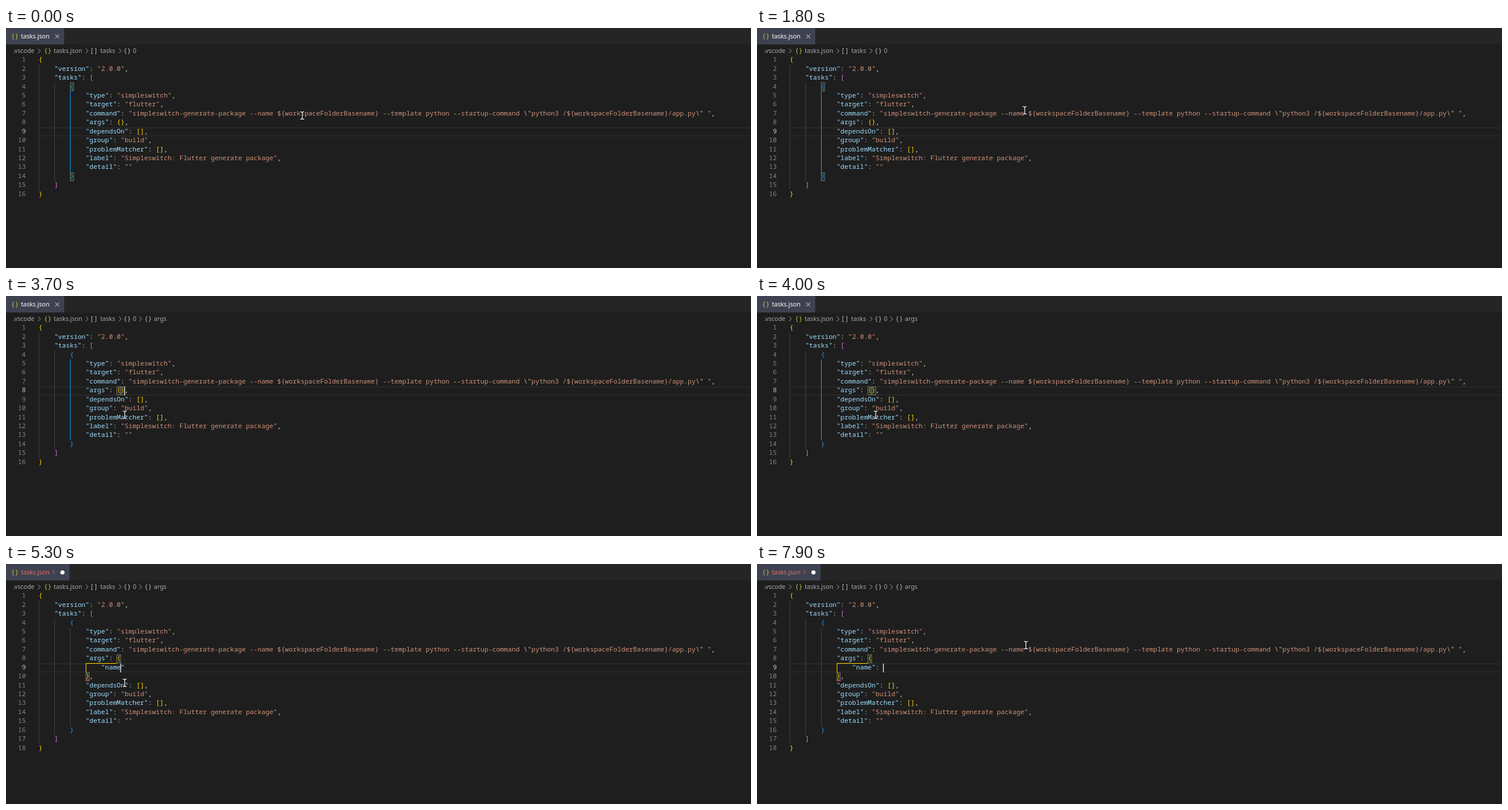
An HTML page with a canvas for the animation above (8000 ms loop, 1280 by 414 pixels).

```html
<!DOCTYPE html>
<html lang="en">
<head>
<meta charset="utf-8">
<title>Editing tasks.json</title>
<style>
  html, body { margin: 0; width: 100%; height: 100%; overflow: hidden; background: #1e1e1e; }
  canvas { display: block; }
</style>
</head>
<body>
<canvas id="stage" width="1280" height="414"></canvas>
<script>
const ctx = document.getElementById('stage').getContext('2d');
const LOOP = 8000, STEP = 100, BLINK = 500;
const LEFT = 56, TOP = 48, CHAR = 6.72, LINE = 15.43, BASELINE = 10.3;
const CODE_FONT = '11.2px "Noto Sans Mono", monospace';
const UI_FONT = '10.55px "Noto Sans", sans-serif';
const KEY = '#9cdcfe', STRING = '#ce9178', ESCAPE = '#d7ba7d', PLAIN = '#d4d4d4';
const BRACKETS = ['#ffd700', '#da70d6', '#179fff'];
const GUIDE = '#404040', ACTIVE_GUIDE = '#707070';

const FOLDER = '${workspaceFolderBasename}';
const HEAD = String.raw`{
    "version": "2.0.0",
    "tasks": [
        {
            "type": "simpleswitch",
            "target": "flutter",
            "command": "simpleswitch-generate-package --name ${FOLDER} --template python --startup-command \"python3 /${FOLDER}/app.py\" ",
            "args": {`;
const TAIL = `},
            "dependsOn": [],
            "group": "build",
            "problemMatcher": [],
            "label": "Simpleswitch: Flutter generate package",
            "detail": ""
        }
    ]
}`;

// "after" puts the caret behind a snippet; "edit" is the new line, with | as the caret.
const ACTIONS = [
  { t: -800, after: '"dependsOn": [],', crumb: '' },
  { t: 2000, after: '--name', crumb: '' },
  { t: 2300, after: '--name', crumb: 'command' },
  { t: 3300, after: '"args": {}', crumb: 'args' },
  { t: 4100, after: '"args": {', crumb: 'args' },
  { t: 4400, edit: '|', crumb: 'args' },
  { t: 4800, edit: '"|"', crumb: 'args' },
  { t: 5300, edit: '"name|"', crumb: 'args' },
  { t: 5900, edit: '"name"|', crumb: 'args' },
  { t: 6800, edit: '"name":|', crumb: 'args' },
  { t: 6900, edit: '"name": |', crumb: 'args' }
];

const MOUSE_START = { x: 509, y: 151 };
const MOUSE_MOVES = [
  { from: 300, to: 500, x: 505, y: 149 },
  { from: 900, to: 1400, x: 478, y: 140 },
  { from: 1500, to: 1800, x: 460, y: 142 },
  { from: 1800, to: 2000, x: 447, y: 149 },
  { from: 2600, to: 2700, x: 222, y: 173 },
  { from: 2700, to: 3000, x: 202, y: 165 },
  { from: 3300, to: 3700, x: 204, y: 205 },
  { from: 7300, to: 7500, x: 194, y: 234 },
  { from: 7500, to: 7900, x: 462, y: 140 }
];

const colX = col => LEFT + col * CHAR;
const lineY = line => TOP + (line - 1) * LINE;
const baseline = line => Math.round(lineY(line) + BASELINE);
const order = (line, col) => line * 1000 + col;

function rect(x, y, w, h, color) {
  ctx.fillStyle = color;
  ctx.fillRect(x, y, w, h);
}

function text(str, x, y, color, font) {
  ctx.font = font;
  ctx.fillStyle = color;
  ctx.fillText(str, x, y);
}

function stroke(points, color, width) {
  ctx.strokeStyle = color;
  ctx.lineWidth = width;
  ctx.beginPath();
  points.forEach(([x, y]) => ctx.lineTo(x, y));
  ctx.stroke();
}

function buildLines(edit) {
  if (edit === undefined) return (HEAD + TAIL).split('\n');
  const pad = ' '.repeat(12);
  return `${HEAD}\n${pad}    ${edit.replace('|', '')}\n${pad}${TAIL}`.split('\n');
}

function findCaret(action, lines) {
  if (action.edit !== undefined) {
    return { line: HEAD.split('\n').length + 1, col: 16 + action.edit.indexOf('|') };
  }
  const index = lines.findIndex(line => line.includes(action.after));
  return { line: index + 1, col: lines[index].indexOf(action.after) + action.after.length };
}

// Returns coloured tokens and the bracket pairs, inner pairs first.
function parse(lines) {
  const tokens = [], pairs = [], open = [];
  lines.forEach((source, i) => {
    for (const { 0: str, index: col } of source.matchAll(/"(?:\\.|[^"\\])*"|[{}[\]:,]/g)) {
      const line = i + 1;
      const add = (part, at, color) => tokens.push({ str: part, line, col: at, color });
      if (str[0] === '"') {
        const base = source.slice(0, col).includes(':') ? STRING : KEY;
        for (const part of str.matchAll(/\\.|[^\\\s]+/g)) {
          add(part[0], col + part.index, part[0][0] === '\\' ? ESCAPE : base);
        }
      } else if ('{['.includes(str)) {
        const color = BRACKETS[open.length % 3];
        open.push({ line, col, color });
        add(str, col, color);
      } else if ('}]'.includes(str)) {
        const start = open.pop();
        pairs.push({ start, end: { line, col }, color: start.color });
        add(str, col, start.color);
      } else {
        add(str, col, PLAIN);
      }
    }
  });
  return { tokens, pairs };
}

// A margin of 1 also accepts a caret that touches the pair from outside.
function enclosing(pairs, caret, margin) {
  const pos = order(caret.line, caret.col);
  return pairs.filter(({ start, end }) =>
    pos > order(start.line, start.col) - margin && pos <= order(end.line, end.col) + margin);
}

function drawGuide({ start, end }, color) {
  const height = (end.line - start.line - 1) * LINE;
  if (height > 0) rect(Math.round(colX(end.col)), lineY(start.line + 1), 1, height, color);
}

function drawGuides(pairs, caret, lines) {
  pairs.forEach(pair => drawGuide(pair, GUIDE));
  const [inner, outer] = enclosing(pairs, caret, 0);
  const { start, end } = inner;
  const empty = !lines.slice(start.line, end.line - 1).join('').trim();
  if (empty) drawGuide(outer, ACTIVE_GUIDE);
  drawGuide(inner, inner.color);
  if (end.line > start.line) {
    const x = Math.round(colX(end.col));
    rect(x, Math.round(lineY(start.line + 1)), colX(start.col) - x, 1, inner.color);
  }
}

function drawBracketBox({ line, col }) {
  const x = Math.round(colX(col)) + 0.5, y = Math.round(lineY(line)) + 0.5;
  rect(x, y, 6, 14, 'rgba(0, 100, 0, 0.1)');
  ctx.strokeStyle = '#7a7a7a';
  ctx.lineWidth = 1;
  ctx.strokeRect(x, y, Math.round(colX(col + 1)) - x - 0.5 + 1 - 0.5, 14);
}

function drawSelection(caret, source, withMatches) {
  const word = 'name';
  for (const { index } of source.matchAll(word)) {
    const selected = index + word.length === caret.col;
    if (!selected && !withMatches) continue;
    rect(colX(index), lineY(caret.line), word.length * CHAR, LINE, selected ? '#264f78' : '#3a4045');
  }
}

function drawLineHighlight(line) {
  [lineY(line), lineY(line + 1) - 1.5].forEach(y => rect(LEFT, y, 1222, 1.5, '#2b2b2b'));
}

function drawLineNumbers(count, active) {
  ctx.textAlign = 'right';
  for (let n = 1; n <= count; n++) {
    text(n, 34, baseline(n), n === active ? '#c6c6c6' : '#858585', CODE_FONT);
  }
  ctx.textAlign = 'left';
}

function bracketIcon(pair, x, y, color) {
  text(pair[0], x, y, color, UI_FONT);
  text(pair[1], x + 6.5, y, color, UI_FONT);
}

function drawTab(dirty, error) {
  const end = error ? 109 : 100, x = end - 12, y = 14.5;
  rect(0, 0, 1280, 28.4, '#252526');
  rect(0, 0, end, 28.4, '#3e4250');
  bracketIcon('{}', 10, 18, '#cbcb41');
  text('tasks.json', 25.7, 18, error ? '#ee6f64' : '#ffffff', UI_FONT);
  if (error) text('1', 79, 18, '#d9685e', '9.5px "Noto Sans", sans-serif');
  if (dirty) {
    ctx.fillStyle = '#ffffff';
    ctx.beginPath();
    ctx.arc(x, y, 3.6, 0, Math.PI * 2);
    ctx.fill();
  } else {
    for (const d of [-3.5, 3.5]) stroke([[x - 3.5, y - d], [x + 3.5, y + d]], '#e4e4e4', 1);
  }
}

function drawBreadcrumbs(last) {
  const gray = '#a9a9a9', icon = '#c0c0c0', y = 43;
  const label = (str, x) => text(str, x, y, gray, UI_FONT);
  const chevron = x => stroke([[x - 2, 35.5], [x + 2, 39.5], [x - 2, 43.5]], gray, 1);
  label('.vscode', 11.7);
  [57, 139, 196].forEach(chevron);
  bracketIcon('{}', 66.5, y, '#cbcb41');
  label('tasks.json', 82);
  bracketIcon('[]', 146, y, icon);
  label('tasks', 162);
  bracketIcon('{}', 203, y, icon);
  label('0', 218);
  if (!last) return;
  chevron(231);
  label(last, 254);
  if (last === 'args') {
    bracketIcon('{}', 239, y, icon);
  } else {
    ctx.strokeStyle = icon;
    ctx.lineWidth = 1;
    ctx.strokeRect(239.5, 35.5, 11, 7);
    text('abc', 241, 41, icon, '5px "Noto Sans", sans-serif');
  }
}

function mouseAt(t) {
  return MOUSE_MOVES.reduce((pos, { from, to, x, y }) => {
    const p = Math.min(1, Math.max(0, (t - from) / (to - from)));
    const eased = p * p * (3 - 2 * p);
    return { x: pos.x + (x - pos.x) * eased, y: pos.y + (y - pos.y) * eased };
  }, MOUSE_START);
}

function drawMouse({ x, y }) {
  ctx.save();
  ctx.translate(x, y);
  ctx.lineCap = 'round';
  for (const [color, width] of [['#101010', 3], ['#f4f4f4', 1.3]]) {
    ctx.strokeStyle = color;
    ctx.lineWidth = width;
    ctx.beginPath();
    for (const side of [-1, 1]) {
      ctx.moveTo(side * 2.8, -6.5);
      ctx.quadraticCurveTo(0, -6.5, 0, -4.5);
      ctx.lineTo(0, 4.5);
      ctx.quadraticCurveTo(0, 6.5, side * 2.8, 6.5);
    }
    ctx.stroke();
  }
  ctx.restore();
}

function drawSquiggle({ line, col }) {
  const x = colX(col), y = lineY(line) + 13.5;
  stroke([0, 1, 2, 3, 4].map(i => [x + i * 1.7, y + (i % 2 ? -1 : 1)]), '#f14c4c', 1);
}

function draw(t) {
  const action = ACTIONS.filter(a => a.t <= t).pop();
  const dirty = action.edit !== undefined;
  const error = t >= 4900;
  const selecting = action.after === '--name' && t >= 2100;
  const lines = buildLines(action.edit);
  const caret = findCaret(action, lines);
  const { tokens, pairs } = parse(lines);

  rect(0, 0, 1280, 414, '#1e1e1e');
  drawTab(dirty, error);
  drawBreadcrumbs(action.crumb);

  if (selecting) drawSelection(caret, lines[caret.line - 1], action.crumb);
  else drawLineHighlight(caret.line);
  drawGuides(pairs, caret, lines);

  const [match] = enclosing(pairs, caret, 1);
  if (!action.crumb || !selecting) [match.start, match.end].forEach(drawBracketBox);

  drawLineNumbers(lines.length, caret.line);
  tokens.forEach(({ str, line, col, color }) => text(str, colX(col), baseline(line), color, CODE_FONT));
  if (error) drawSquiggle(match.end);

  const caretOn = Math.floor((t - action.t) / BLINK) % 2 === 0;
  if (caretOn) rect(colX(caret.col) - 0.9, lineY(caret.line) + 0.3, 1.6, LINE - 0.3, '#d0d0d0');
  drawMouse(mouseAt(t));
}

function tick() {
  const t = performance.now() % LOOP;
  draw(t - t % STEP);
  requestAnimationFrame(tick);
}
tick();
</script>
</body>
</html>
```
